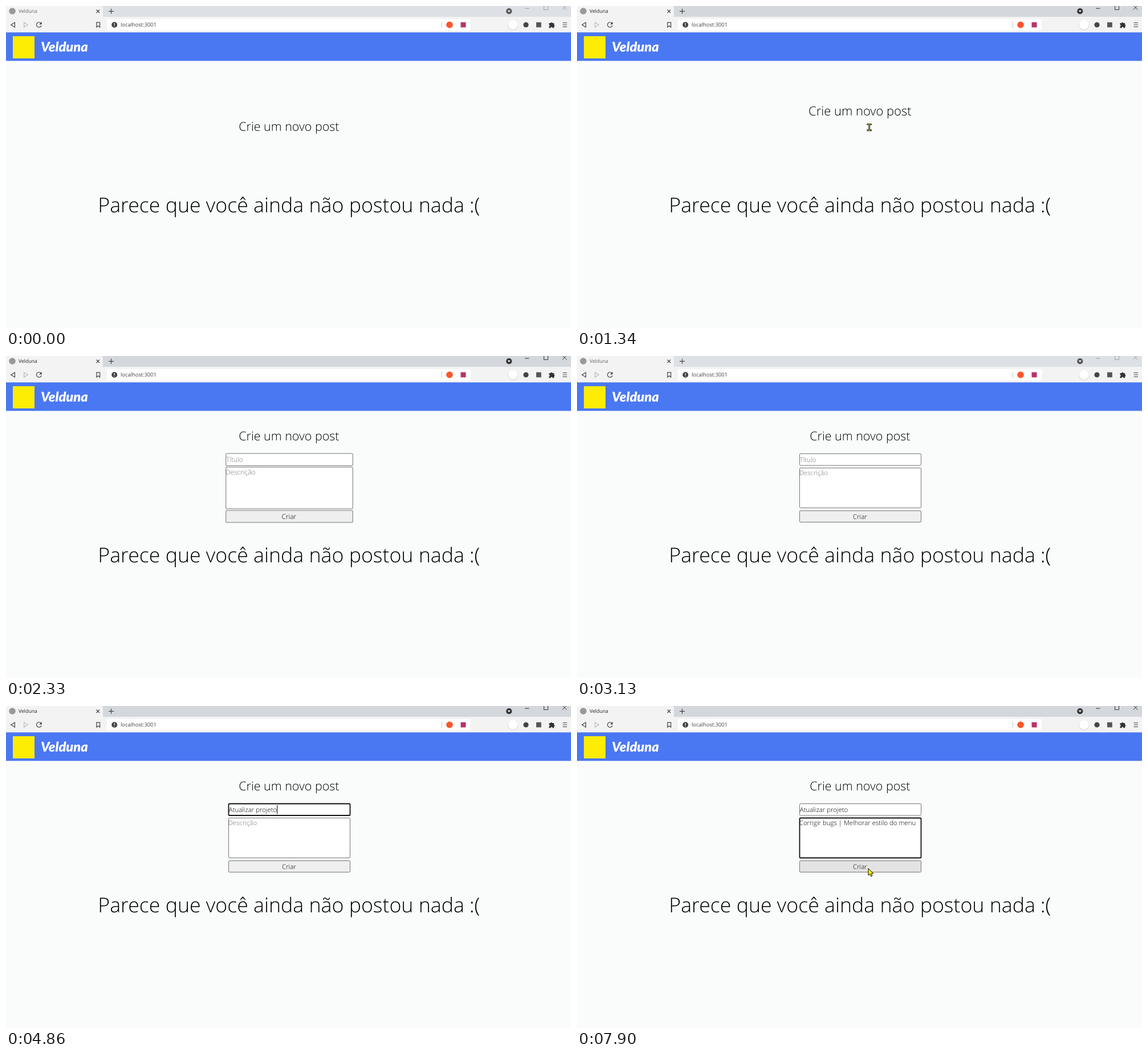
An HTML page for the animation above (8000 ms loop, 991 by 565 pixels).

```html
<!DOCTYPE html>
<html lang="pt-BR">
<head>
<meta charset="utf-8">
<title>Velduna</title>
<style>
  html, body { margin: 0; width: 100%; height: 100%; overflow: hidden; background: #fafcfc; }
  svg { display: block; width: 100%; height: 100%; }
  text { font-family: "Open Sans", "Noto Sans", sans-serif; text-rendering: geometricPrecision; white-space: pre; }
  .light { font-weight: 300; fill: #000; }
  .field { font-size: 11.43px; }
  .mid { text-anchor: middle; }
  .hint { fill: #757575; }
  .box { fill: #fff; stroke: #767676; stroke-width: 1; }
  .ring { fill: none; stroke: #101010; stroke-width: 1.8; }
  .line { fill: none; stroke: #444; stroke-width: 1.2; }
  .caret { fill: #000; }
</style>
</head>
<body>
<svg viewBox="0 0 991 565">
  <!-- tab strip -->
  <rect id="strip" width="991" height="20"/>
  <path d="M0 0H167Q170 0 170 3V20H0Z" fill="#f3f3f3"/>
  <circle cx="11" cy="9" r="5.8" fill="#999"/>
  <text id="tab" x="22" y="12.2" font-size="8.7">Velduna</text>
  <path class="line" d="M158.5 6.5l5.5 5.5m0-5.5l-5.5 5.5M180 9.3h9M184.5 4.8v9"/>
  <g id="controls" stroke-width=".9">
    <circle cx="882.3" cy="9.2" r="5.1" stroke="none"/>
    <path d="M879.8 7.8h5l-2.5 3.3z" fill="#fff" stroke="none"/>
    <path d="M910 4.2h7.5M943.5-1v7.5h7v-7.5M975.8-1l7.6 7.6m0-7.6l-7.6 7.6" fill="none"/>
  </g>

  <!-- toolbar -->
  <rect y="19" width="991" height="28" fill="#f3f3f3"/>
  <rect x="177" y="23" width="638" height="20" rx="2.5" fill="#fff"/>
  <path class="line" d="M15.4 28.8v8.4l-6.6-4.2z"/>
  <path class="line" d="M31.6 28.8v8.4l6.6-4.2z" style="stroke:#bbb"/>
  <path class="line" d="M61.2 30a4.4 4.4 0 1 0 .9 4.2"/>
  <path d="M62.6 27.8v4.4h-4.4z" fill="#444"/>
  <path class="line" d="M158.8 28.8h5.8v8.4l-2.9-2.5-2.9 2.5z"/>
  <circle cx="190.2" cy="33" r="5" fill="#444"/>
  <path d="M190.2 30v3.6m0 1.2v1.2" stroke="#fff" stroke-width="1.3"/>
  <text x="201" y="36.2" font-size="9.35" fill="#444">localhost:3001</text>
  <path d="M764.2 27.5v11" stroke="#c4c4c4"/>
  <circle cx="778" cy="33" r="5.8" fill="#fb542b"/>
  <rect x="797.5" y="28.5" width="9" height="9" fill="#b8336a"/>
  <circle cx="889.3" cy="33.6" r="9" fill="#d2d2d2"/>
  <circle cx="889.3" cy="33" r="8.4" fill="#fff"/>
  <circle cx="912" cy="33" r="4.6" fill="#444"/>
  <rect x="930" y="28.6" width="8.8" height="8.8" fill="#555"/>
  <path d="M952.5 30h2.7a1.7 1.7 0 0 1 3.3 0h2.7v2.8a1.7 1.7 0 0 1 0 3.2v2.4h-2.6a1.6 1.6 0 0 0-3.2 0h-2.9v-2.6a1.6 1.6 0 0 0 0-3.1z" fill="#333"/>
  <path class="line" d="M976.5 29.5h7.5m-7.5 3.5h7.5m-7.5 3.5h7.5"/>

  <!-- header -->
  <rect y="46.3" width="991" height="50" fill="#4a78f3"/>
  <rect x="12" y="53" width="38" height="39" fill="#fdec04"/>
  <text x="61" y="80" fill="#fff" style="font:italic 900 23.5px Lato,sans-serif">Velduna</text>

  <!-- page -->
  <g id="title"><text class="light mid" x="496.3" y="148" font-size="21.43">Crie um novo post</text></g>
  <text class="light mid" x="496.3" y="362" font-size="35.71">Parece que você ainda não postou nada :(</text>
  <g id="form">
    <g id="name"></g>
    <g id="body"></g>
    <g id="send">
      <rect class="box" id="button" x="390.5" y="271.5" width="213" height="20" rx="1.6"/>
      <text class="light field mid" x="496.4" y="285.8">Criar</text>
    </g>
  </g>

  <path id="arrow" d="M0 0V12.2L2.8 9.7 4.7 14 6.8 13 5 9H8.7Z" fill="#ff0" stroke="#000" stroke-linejoin="round"/>
  <g id="beam" fill="none" stroke-linecap="square">
    <path d="M-2.8-5.2H2.8M-2.8 5.2H2.8M0-5V5" stroke="#222" stroke-width="2.8"/>
    <path d="M-2.8-5.2H2.8M-2.8 5.2H2.8M0-5V5" stroke="#d8c820" stroke-width=".9"/>
  </g>
</svg>
<script>
const LOOP = 8000;
const $ = id => document.getElementById(id);
const clamp = v => Math.max(0, Math.min(1, v));
const ramp = (t, a, b) => clamp((t - a) / (b - a));
const ease = (t, a, b) => { const p = ramp(t, a, b); return p * p * (3 - 2 * p); };
const within = (t, a, b) => t >= a && t < b;
const show = (el, on) => el.style.display = on ? "" : "none";
const scaleAt = (el, cx, cy, s, dy = 0) =>
  el.setAttribute("transform", `translate(${cx} ${cy + dy}) scale(${s}) translate(${-cx} ${-cy})`);

// Pointer trips: time, x, y
const trips = [
  [[530, 640, 366], [800, 570, 300], [1000, 543, 262], [1130, 515, 213], [1300, 512.7, 212.8],
   [1400, 512.7, 212.8], [1550, 600, 222], [1700, 742, 235]],
  [[3330, 984, 72], [3500, 880, 95], [3700, 700, 135], [3900, 545, 170], [4040, 515, 177],
   [4200, 515, 179], [4330, 660, 206], [4430, 840, 235], [4520, 982, 250]],
  [[6400, 980, 130], [6470, 980, 130], [6560, 840, 183], [6660, 660, 214], [6780, 515, 232],
   [7180, 513, 238], [7270, 508, 262], [7360, 511, 281], [7480, 511, 281], [7570, 511, 285], [LOOP, 511, 285]]
];

const fields = [
  { id: "name", top: 171.5, h: 20.5, x: 390.8, base: 185.8, caretTop: 174, hint: "Título",
    text: "Atualizar projeto", from: 4250, step: 35, focus: [4110, 5590], blink: 5260 },
  { id: "body", top: 196.5, h: 70, x: 389.8, base: 208.8, caretTop: 197, hint: "Descrição",
    text: "Corrigir bugs | Melhorar estilo do menu", from: 6870, step: 11, focus: [6830, LOOP], blink: 7900 }
];

for (const f of fields) {
  const rect = cls => `<rect class="${cls}" x="390.5" y="${f.top}" width="213" height="${f.h}" rx="1.6"/>`;
  f.el = $(f.id);
  f.el.innerHTML = rect("box") + rect("ring") +
    `<text class="light field" x="${f.x}" y="${f.base}"></text>` +
    `<rect class="caret" y="${f.caretTop}" width="1" height="15.5"/>`;
  f.ring = f.el.querySelector(".ring");
  f.label = f.el.querySelector("text");
  f.caret = f.el.querySelector(".caret");
}

function pointer(t) {
  for (const trip of trips) {
    for (let i = 1; i < trip.length; i++) {
      const [a, x, y] = trip[i - 1], [b, u, v] = trip[i];
      if (within(t, a, b)) {
        const p = (t - a) / (b - a);
        return { x: x + (u - x) * p, y: y + (v - y) * p };
      }
    }
  }
  return null;
}

function drawField(f, t, s) {
  const n = Math.max(0, Math.min(f.text.length, Math.floor((t - f.from) / f.step)));
  const typed = f.text.slice(0, n);
  const focused = within(t, ...f.focus);
  f.label.textContent = typed || f.hint;
  f.label.classList.toggle("hint", !n);
  show(f.ring, focused);
  show(f.caret, focused && t < f.blink);
  f.caret.setAttribute("x", f.x + (n ? f.label.getComputedTextLength() : 0));
  scaleAt(f.el, 497, f.top + f.h / 2, s);
}

function drawWindow(active) {
  $("strip").setAttribute("fill", active ? "#d4d8dc" : "#dde1e5");
  $("tab").setAttribute("fill", active ? "#222" : "#666");
  $("controls").setAttribute("fill", active ? "#333" : "#555");
  $("controls").setAttribute("stroke", active ? "#222" : "#999");
}

function drawPointer(t) {
  const p = pointer(t);
  const overField = p && t > 3000 && within(p.x, 390, 603) &&
    fields.some(f => within(p.y, f.top, f.top + f.h));
  const overTitle = within(t, 1090, 1420);
  const beam = overField || overTitle;
  show($("arrow"), p && !beam);
  show($("beam"), p && beam);
  if (p) $(beam ? "beam" : "arrow").setAttribute("transform", `translate(${p.x} ${p.y})`);
  const hover = p && t > 7000 && p.y > 271;
  $("button").style.fill = hover ? "#e3e3e3" : "#efefef";
}

function draw(t) {
  drawWindow(within(t, 1080, 3130) || within(t, 4180, 5590) || t >= 6830);

  const lift = ease(t, 1080, 1700);
  const grow = ease(t, 950, 1130) * (1 - ease(t, 1180, 1500));
  scaleAt($("title"), 496.3, 140, 1 + .05 * grow, 71 * (1 - lift));

  $("form").style.opacity = ramp(t, 1660, 2160);
  const s = 1.1 - .1 * ease(t, 2020, 2600);
  for (const f of fields) drawField(f, t, s);
  scaleAt($("send"), 497, 281.5, s);

  drawPointer(t);
}

function tick() {
  draw(performance.now() % LOOP);
  requestAnimationFrame(tick);
}
tick();
</script>
</body>
</html>
```
